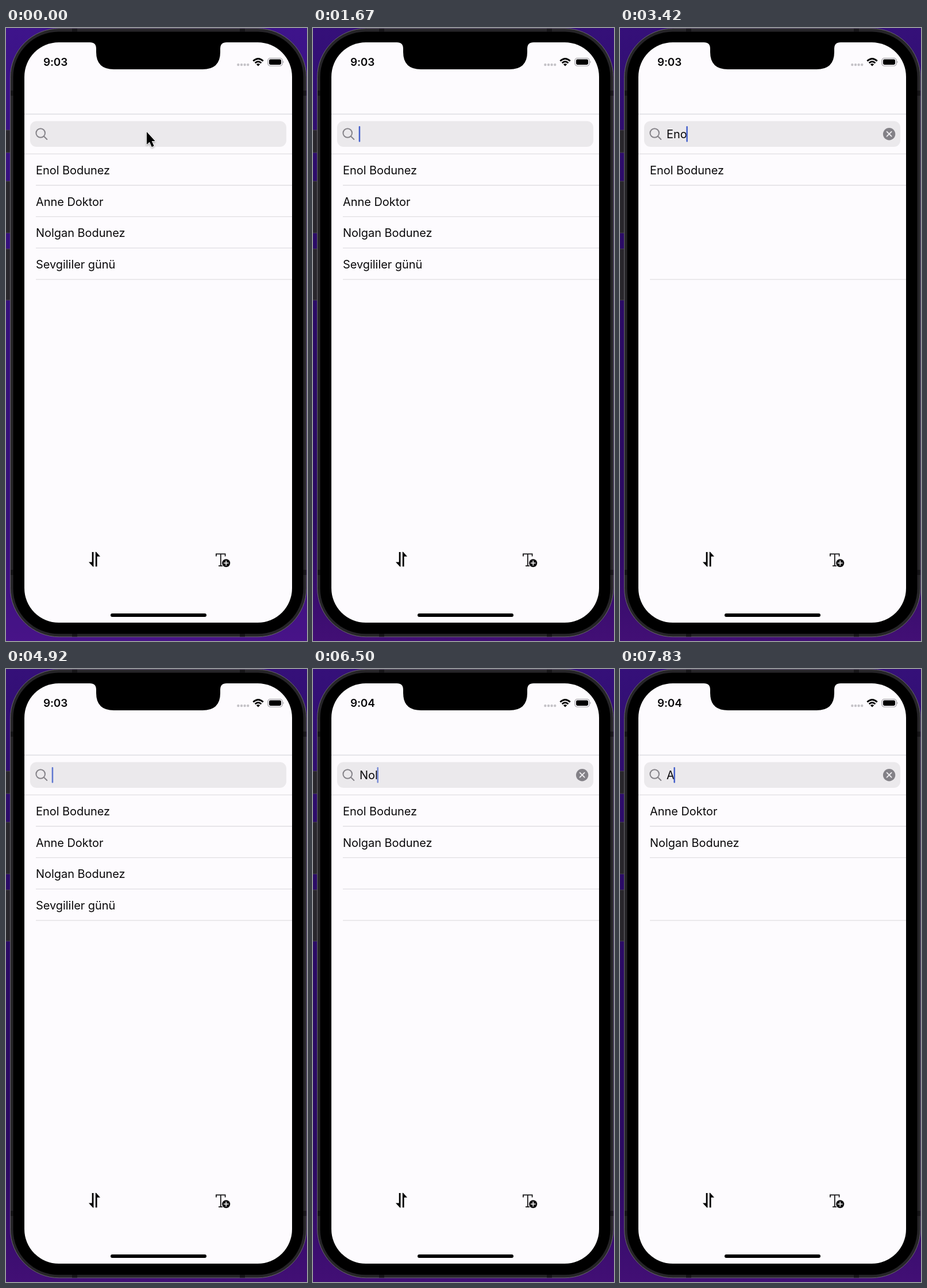
Recreate the animation shown at these times as an HTML page. Size 524 px wide and 1068 px high, loop 8 s.

```html
<!DOCTYPE html>
<html lang="tr">
<head>
<meta charset="utf-8">
<title>Search list</title>
<style>
  html, body { margin: 0; width: 100%; height: 100%; overflow: hidden; background: #2b0b66; }
  svg { display: block; width: 524px; height: 1068px; }
  text { font: 400 20px Inter, "Open Sans", sans-serif; letter-spacing: -.05px; fill: #09080a; }
  #clock { font-size: 19px; font-weight: 600; letter-spacing: -.2px; }
  .button { fill: #29272c; stroke: #47454b; stroke-width: 1; }
  .band { fill: #161518; }
  .rule { stroke: #e0dee2; stroke-width: 1.3; }
</style>
</head>
<body>
<svg viewBox="0 0 524 1068">
  <defs>
    <linearGradient id="wall" x2="0" y2="1">
      <stop offset="0" stop-color="#351079"/>
      <stop offset=".3" stop-color="#2b0b66"/>
      <stop offset=".8" stop-color="#2b0a62"/>
      <stop offset="1" stop-color="#420f75"/>
    </linearGradient>
    <filter id="shadow" x="-50%" y="-50%" width="200%" height="200%">
      <feDropShadow dx="0" dy="1.5" stdDeviation="1.5" flood-opacity=".35"/>
    </filter>
  </defs>

  <rect width="524" height="1068" fill="url(#wall)"/>
  <rect id="glow" width="524" height="1068" fill="#5a20c0" opacity=".25"/>

  <g id="phone">
    <rect class="button" x="-4" y="178" width="12" height="39"/>
    <rect class="button" x="-4" y="267" width="12" height="90"/>
    <rect class="button" x="-4" y="385" width="12" height="89"/>
    <rect x="7.5" y=".8" width="515.5" height="1060" rx="85" fill="#262528" stroke="#69676c"/>
    <g class="band">
      <rect x="8" y="109" width="5" height="9"/><rect x="8" y="944" width="5" height="9"/>
      <rect x="517" y="109" width="5.5" height="9"/><rect x="517" y="944" width="5.5" height="9"/>
      <rect x="115" y="1.5" width="9" height="5"/><rect x="407" y="1.5" width="9" height="5"/>
      <rect x="115" y="1055" width="9" height="5.5"/><rect x="407" y="1055" width="9" height="5.5"/>
    </g>
    <rect x="12.5" y="6.5" width="505" height="1049" rx="79"/>
    <rect x="32" y="25" width="466" height="1011" rx="60" fill="#fdfbfe"/>
    <path d="M146 24V25Q157 25 157 36V42Q157 72 188 72H342Q373 72 373 42V36Q373 25 384 25V24Z"/>
  </g>

  <g id="status">
    <text id="clock" x="65" y="66"></text>
    <g fill="#c5c3c8">
      <circle cx="404.3" cy="64" r="2.2"/><circle cx="410" cy="64" r="2.2"/>
      <circle cx="415.6" cy="64" r="2.2"/><circle cx="421.2" cy="64" r="2.2"/>
    </g>
    <g fill="none" stroke="#000" stroke-width="2.7">
      <path d="M430.3 57.6Q439 49.4 447.7 57.6"/>
      <path d="M433.6 61Q439 56 444.4 61"/>
    </g>
    <path d="M435.8 63.3Q439 60.6 442.2 63.3L439 66.6Z"/>
    <rect x="456" y="52.5" width="25" height="13.5" rx="4" fill="none" stroke="#9b999e" stroke-width="1.2"/>
    <rect x="458" y="54.5" width="21" height="9.5" rx="2.4"/>
    <path d="M482.4 57Q484.6 59.2 482.4 61.5Z" fill="#9b999e"/>
  </g>

  <g id="search">
    <path class="rule" d="M32 150H498M32 219.3H498"/>
    <rect x="42" y="162.3" width="446" height="44.7" rx="11" fill="#ebe9ec"/>
    <g fill="none" stroke="#858389" stroke-width="2" stroke-linecap="round">
      <circle cx="60.2" cy="183" r="7.8"/><path d="M66 188.8L71.3 194"/>
    </g>
    <text id="query" x="81" y="192"></text>
    <rect id="caret" y="171" width="2.5" height="27.5" rx="1" fill="#4460cb"/>
    <g id="clear">
      <circle cx="468.6" cy="184.7" r="10.7" fill="#838187"/>
      <path d="M464.6 180.7l8 8m0-8l-8 8" stroke="#efedf0" stroke-width="1.9" stroke-linecap="round"/>
    </g>
  </g>

  <g id="list"></g>

  <g id="toolbar">
    <path d="M149.7 913H152.5V938.5H151.4L144 930.6H149.7Z"/>
    <path d="M158.6 938.3H155.8V912.8H156.9L164 920.8H158.6Z"/>
    <path d="M365.9 920.5V916.3H381.6V920.5M373.8 916.3V937M370 937.2H377" fill="none" stroke="#171618" stroke-width="1.8"/>
    <circle cx="383.2" cy="932.2" r="8" fill="#fdfbfe"/>
    <circle cx="383.2" cy="932.2" r="7" fill="#111012"/>
    <path d="M379 932.2h8.4m-4.2-4.2v8.4" stroke="#fff" stroke-width="1.5"/>
    <rect x="182" y="1020" width="167" height="6" rx="3"/>
  </g>

  <path id="pointer" d="M0 0V22L4.9 17.4L8.8 26.3L12.6 24.6L8.8 16H14.6Z" transform="translate(-50)"
    stroke="#fff" stroke-width="1.6" paint-order="stroke" stroke-linejoin="round" filter="url(#shadow)"/>
</svg>

<script>
const LOOP = 8000;
const FOCUS = 630;
const ROW_TOP = 219.3, ROW_HEIGHT = 54.7;
const entries = ["Enol Bodunez", "Anne Doktor", "Nolgan Bodunez", "Sevgililer günü"];

// [time, query, visible entries, rows whose separator is hidden]
const all = [0, 1, 2, 3];
const steps = [
  [FOCUS, "", all, []],
  [2830, "E", all, []],
  [3080, "En", [0], [1, 2]],
  [3330, "Eno", [0], [1, 2]],
  [4080, "En", [0], [1, 2]],
  [4230, "E", all, []],
  [4390, "", all, []],
  [5330, "N", [0, 2, 3], []],
  [5660, "No", [0, 2, 3], []],
  [5940, "Nol", [0, 2], []],
  [6660, "No", [0, 2, 3], []],
  [6830, "N", [0, 2, 3], []],
  [7000, "", all, []],
  [7420, "A", [1, 2], [2]],
];

const byId = id => document.getElementById(id);
const [glow, clock, query, caret, clear, list, pointer] =
  ["glow", "clock", "query", "caret", "clear", "list", "pointer"].map(byId);
const clamp = v => Math.max(0, Math.min(1, v));
const ease = v => v * v * (3 - 2 * v);
const show = (node, on) => node.setAttribute("visibility", on ? "visible" : "hidden");

function add(tag, attrs) {
  const node = document.createElementNS("http://www.w3.org/2000/svg", tag);
  for (const key in attrs) node.setAttribute(key, attrs[key]);
  return list.appendChild(node);
}

const rows = entries.map((_, i) => {
  const top = ROW_TOP + i * ROW_HEIGHT;
  return {
    label: add("text", { x: 52, y: top + 35.5 }),
    rule: add("path", { class: "rule", d: `M52 ${top + ROW_HEIGHT}H498` }),
  };
});

// Solid, fade out, pause, fade in; restarts after each key press.
function blink(elapsed) {
  const p = (elapsed % 1000) / 1000;
  return p < .5 ? 1 : p < .75 ? 1 - clamp((p - .5) / .2) : clamp((p - .82) / .18);
}

function draw(t) {
  const [since, typed, visible, hiddenRules] = steps.findLast(s => s[0] <= t) || steps[0];

  clock.textContent = t < 5700 ? "9:03" : "9:04";
  show(glow, t < 80);
  query.textContent = typed;
  show(clear, typed);

  const width = typed ? query.getComputedTextLength() : 0;
  caret.setAttribute("x", 79.7 + width);
  caret.setAttribute("opacity", t < FOCUS ? 0 : blink(t - since));

  rows.forEach(({ label, rule }, i) => {
    label.textContent = entries[visible[i]] || "";
    show(rule, !hiddenRules.includes(i));
  });

  const x = 245 + 12 * ease(clamp((t - 80) / 750));
  pointer.setAttribute("transform", `translate(${x} 181)`);
  show(pointer, t < 1580);
}

function tick() {
  draw(performance.now() % LOOP);
  requestAnimationFrame(tick);
}
tick();
</script>
</body>
</html>
```
